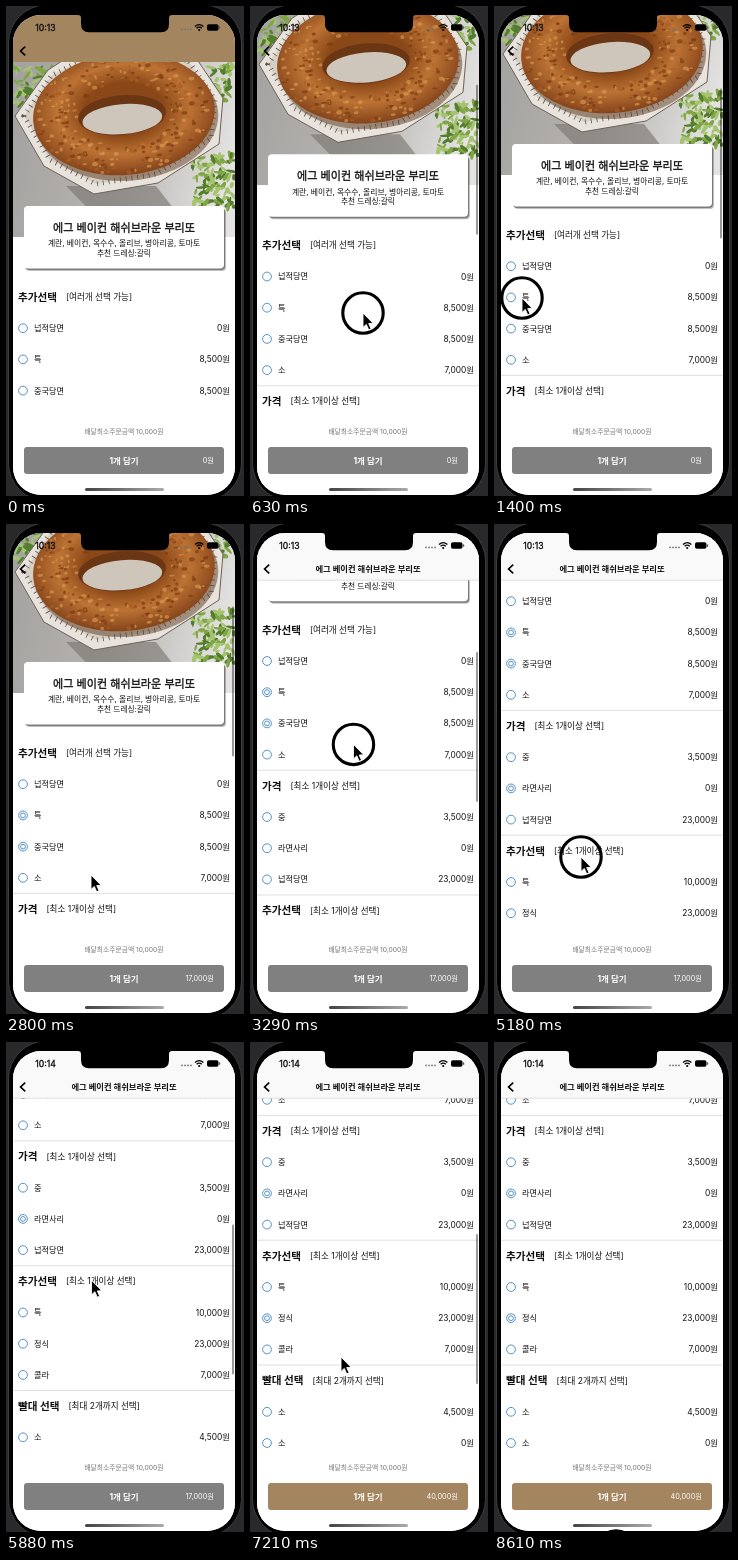
Write an HTML page that moves like this. It is 238 by 490 pixels and loops after 8.68 s.

```html
<!DOCTYPE html>
<html lang="ko">
<head>
<meta charset="utf-8">
<title>메뉴 선택</title>
<style>
  html, body { margin: 0; width: 100%; height: 100%; overflow: hidden; background: #29292b; }
  svg { display: block; width: 238px; height: 490px; }
  text { font-family: Inter, 'Noto Sans CJK KR', 'Noto Sans CJK', sans-serif; fill: #111; }
  .medium { stroke: #111; stroke-width: .3px; }
  .bold { font-weight: 700; }
  .white { fill: #fff; }
  .grey { fill: #777; }
</style>
</head>
<body>
<svg viewBox="0 0 238 490" xmlns="http://www.w3.org/2000/svg">
  <defs>
    <clipPath id="screen"><rect x="7" y="9" width="222" height="480" rx="28"/></clipPath>
    <clipPath id="photoBox"><rect x="7" y="56" width="222" height="175"/></clipPath>
    <linearGradient id="cloth" x1="0" y1=".3" x2="1" y2=".5">
      <stop offset="0" stop-color="#a5a3a1"/><stop offset=".5" stop-color="#b5b2af"/><stop offset="1" stop-color="#e4e3e1"/>
    </linearGradient>
    <radialGradient id="crust" cx=".5" cy=".46" r=".54">
      <stop offset=".4" stop-color="#8a4717"/><stop offset=".68" stop-color="#bd7334"/><stop offset="1" stop-color="#84431a"/>
    </radialGradient>
    <linearGradient id="homeBar">
      <stop offset="0" stop-color="#444"/><stop offset="1" stop-color="#aaa"/>
    </linearGradient>
  </defs>
  <rect x="2.5" y="-1" width="233" height="496" rx="38" stroke="#3c3c3e"/>
  <g clip-path="url(#screen)">
    <rect x="7" y="9" width="222" height="480" fill="#fff"/>
    <g id="page">
      <rect x="7" y="-40" width="222" height="97" fill="#a3855f"/>
      <g clip-path="url(#photoBox)">
        <rect x="7" y="56" width="222" height="175" fill="url(#cloth)"/>
        <path d="M60 180L110 231H190L150 180Z" fill="#77736f" opacity=".6"/>
        <g id="leaves"></g>
        <path d="M9 110L42 64L70 46H186L217 92L213 138L152 177L88 188L38 160Z" fill="#e8e3dc" stroke="#6d6259"/>
        <path d="M18 110L45 70L76 54H182L209 94L205 132L150 168L90 178L44 154Z" fill="#d6cfc6" stroke="#5d5148" stroke-width="5" stroke-dasharray=".8 5"/>
        <g transform="rotate(-5 118 109)">
          <ellipse cx="121" cy="114" rx="91" ry="61" fill="#5d3a22" opacity=".5"/>
          <ellipse cx="118" cy="108" rx="91" ry="61" fill="url(#crust)"/>
          <g id="crumbs"></g>
          <ellipse cx="116" cy="109" rx="44" ry="20" fill="#6b3614"/>
          <ellipse cx="116" cy="113" rx="40" ry="15" fill="#cfc6bb"/>
        </g>
      </g>
      <rect x="20" y="203" width="200" height="62" rx="4" opacity=".25"/>
      <rect x="19" y="202" width="200" height="62" rx="4" fill="#666" opacity=".75"/>
      <rect x="18" y="200" width="200" height="62.5" rx="4" fill="#fff"/>
    </g>
    <rect id="bar" x="226" width="2" height="150" rx="1" opacity=".4"/>
    <rect x="7" y="410.5" width="222" height="80" fill="#fff"/>
    <rect id="button" x="18" y="441" width="200" height="27" rx="3"/>
    <g id="footer"></g>
    <g id="header">
      <rect x="7" y="9" width="222" height="47" fill="#f9f9f9"/>
      <path d="M7 56.2H229" stroke="#d2d2d2" stroke-width=".7"/>
    </g>
    <path d="M19.2 40.6L14.6 45L19.2 49.4" fill="none" stroke="#000" stroke-width="1.7"/>
    <g id="status">
      <path d="M176 23.4H186" stroke="#777" stroke-width="1.8" stroke-linecap="round" stroke-dasharray="0 3"/>
      <path d="M189 20.4Q193.2 16.8 197.4 20.4M190.6 22.3Q193.2 20 195.8 22.3" fill="none" stroke="#000" stroke-width="1.3"/>
      <circle cx="193.2" cy="24" r="1.1"/>
      <rect x="201" y="18.3" width="11.5" height="6.4" rx="1.8"/>
      <rect x="213" y="20.3" width="1.2" height="2.4" rx=".5" fill="#555"/>
    </g>
    <path d="M72 9Q75 9 75 12V18Q75 26.3 83 26.3H155Q163 26.3 163 18V12Q163 9 166 9Z"/>
    <rect x="79" y="482" width="79" height="3" rx="1.5" fill="url(#homeBar)"/>
  </g>
  <g id="cursor">
    <circle id="ring" r="20.2" fill="none" stroke="#000" stroke-width="3.1"/>
    <path d="M0 0V14.5L3.3 11.4L5.7 16.8L8.1 15.8L5.7 10.6L10.2 10.4Z" stroke="#fff" stroke-width=".9"/>
  </g>
</svg>
<script>
const LOOP = 8680, STEP = 70, HOLD = 140, ROW = 31.2;
const $ = id => document.getElementById(id);
const page = $('page'), footer = $('footer');

function add(parent, tag, attrs) {
  const el = document.createElementNS('http://www.w3.org/2000/svg', tag);
  for (const k in attrs) el.setAttribute(k, attrs[k]);
  return parent.appendChild(el);
}

// y is the middle of the line
function label(parent, str, x, y, size, look = '', anchor = 'start') {
  const el = add(parent, 'text', { x, y: y + size * 0.36, 'font-size': size, class: look, 'text-anchor': anchor });
  el.textContent = str;
  return el;
}

// Cursor: each stop is an arrival; the next move starts HOLD ms later.
const stop = (kind, t, x, y) => ({ kind, t, x, y });
const stops = [
  stop('move', 70, 114, 358), stop('drag', 630, 113, 307),
  stop('tap', 1400, 28, 292), stop('tap', 2380, 34, 323),
  stop('move', 2800, 85, 351), stop('drag', 3500, 112, 160),
  stop('tap', 4480, 47, 265),
  stop('move', 5110, 87, 333), stop('drag', 5700, 86, 238),
  stop('tap', 6580, 31, 279),
  stop('move', 7210, 91, 315), stop('move', 7840, 110, 470), stop('tap', 8610, 122, 509)
];
const taps = stops.filter(p => p.kind === 'tap').map(p => p.t + HOLD);
const drags = [
  { from: 0, to: 850, by: 62, barOff: 2870 },
  { from: 2870, to: 3550, by: 183, barOff: 5110 },
  { from: 5250, to: 6160, by: 113, barOff: 7980 }
];

// Photo details
let seed = 11;
const rnd = () => (seed = (seed * 16807) % 2147483647) / 2147483647;
for (let i = 0; i < 320; i++) {
  const a = rnd() * 2 * Math.PI, r = 0.52 + rnd() * 0.45;
  add($('crumbs'), 'ellipse', {
    cx: 118 + Math.cos(a) * 91 * r, cy: 108 + Math.sin(a) * 61 * r,
    rx: 1 + rnd() * 2.2, ry: 0.7 + rnd() * 1.4, opacity: 0.65,
    fill: ['#d8984f', '#783a12', '#a95f26'][i % 3]
  });
}
function sprig(x, y, w, h) {
  for (let i = 0; i < w * h / 24; i++) {
    const cx = x + rnd() * w, cy = y + rnd() * h;
    add($('leaves'), 'ellipse', {
      cx, cy, rx: 2 + rnd() * 4, ry: 1 + rnd() * 1.3,
      transform: `rotate(${rnd() * 180} ${cx} ${cy})`,
      fill: ['#7fa544', '#a5c470', '#527d2c'][i % 3]
    });
  }
}
sprig(8, 62, 44, 38);
sprig(186, 148, 42, 54);
sprig(204, 58, 24, 36);

// Menu card
const MENU = '에그 베이컨 해쉬브라운 부리또';
label(page, MENU, 118, 222, 11.1, 'medium', 'middle');
label(page, '계란, 베이컨, 옥수수, 올리브, 병아리콩, 토마토', 118, 237.5, 7.85, '', 'middle');
label(page, '추천 드레싱:갈릭', 118, 247, 7.7, '', 'middle');

// Options: name, price and, if it gets picked, the tap that does it
const sections = [
  ['추가선택', '[여러개 선택 가능]', [['넙적당면', 0], ['특', 8500, 0], ['중국당면', 8500, 1], ['소', 7000]]],
  ['가격', '[최소 1개이상 선택]', [['중', 3500], ['라면사리', 0, 2], ['넙적당면', 23000]]],
  ['추가선택', '[최소 1개이상 선택]', [['특', 10000], ['정식', 23000, 3], ['콜라', 7000]]],
  ['빨대 선택', '[최대 2개까지 선택]', [['소', 4500], ['소', 0]]]
];
const won = n => n.toLocaleString('en-US') + '원';
const picks = [];
let y = 291;
sections.forEach(([name, note, options], i) => {
  if (i) add(page, 'path', { d: `M7 ${y - ROW / 2}H229`, stroke: '#d8d8d8', 'stroke-width': 0.8 });
  const head = label(page, name, 12, y, 10.6, 'bold');
  add(head, 'tspan', { dx: 9, dy: -0.7, 'font-size': 8.55, 'font-weight': 400 }).textContent = note;
  y += ROW;
  for (const [text, price, tap] of options) {
    const circle = r => add(page, 'circle', { cx: 17, cy: y, r, fill: 'none', stroke: '#4386c5', 'stroke-width': 0.9 });
    circle(4.4);
    if (tap !== undefined) picks.push({ at: taps[tap], price, el: circle(2.4) });
    label(page, text, 28, y, 8.2);
    label(page, won(price), 224, y, 8.4, '', 'end');
    y += ROW;
  }
});

label(footer, '배달최소주문금액 10,000원', 118, 426, 6.75, 'grey', 'middle');
label(footer, '1개 담기', 118, 454.5, 8.5, 'bold white', 'middle');
const total = label(footer, '', 208, 454.5, 7.3, 'white', 'end');
label($('header'), MENU, 118, 45, 8.3, 'bold', 'middle');
const clock = label($('status'), '', 39.5, 21.8, 8.7, 'medium', 'middle');

// Motion
const clamp = p => Math.min(1, Math.max(0, p));
const ease = (t, from, to) => {
  const p = clamp((t - from) / (to - from));
  return p * p * (3 - 2 * p);
};
const show = (el, on) => el.setAttribute('visibility', on ? 'visible' : 'hidden');

function cursorAt(t) {
  const pos = { x: stops[0].x, y: stops[0].y, down: false };
  stops.forEach((p, i) => {
    if (!i) return;
    const last = stops[i - 1], k = ease(t, last.t + HOLD, p.t);
    pos.x += (p.x - last.x) * k;
    pos.y += (p.y - last.y) * k;
    if (p.kind === 'drag') pos.down ||= t > last.t && t < p.t + STEP;
    if (p.kind === 'tap') pos.down ||= t >= p.t - STEP && t < p.t + HOLD;
  });
  return pos;
}

function draw(t) {
  const scroll = drags.reduce((sum, d) => sum + d.by * ease(t, d.from, d.to), 0);
  page.setAttribute('transform', `translate(0 ${-scroll})`);
  $('bar').setAttribute('y', 59.5 + 0.37 * scroll);
  show($('bar'), drags.some(d => t > d.from && t < d.barOff));
  $('header').setAttribute('opacity', clamp((scroll - 90) / 45));

  const done = picks.filter(p => t >= p.at);
  picks.forEach(p => show(p.el, t >= p.at));
  total.textContent = won(done.reduce((sum, p) => sum + p.price, 0));
  $('button').setAttribute('fill', done.length < picks.length ? '#808080' : '#a3855f');
  clock.textContent = t < 5740 ? '10:13' : '10:14';

  const c = cursorAt(t);
  $('cursor').setAttribute('transform', `translate(${c.x} ${c.y})`);
  show($('cursor'), t > 0);
  show($('ring'), t > 0 && c.down);
}

const start = performance.now();
function tick() {
  const t = (performance.now() - start) % LOOP;
  draw(Math.floor(t / STEP) * STEP);
  requestAnimationFrame(tick);
}
draw(0);
requestAnimationFrame(tick);
</script>
</body>
</html>
```
